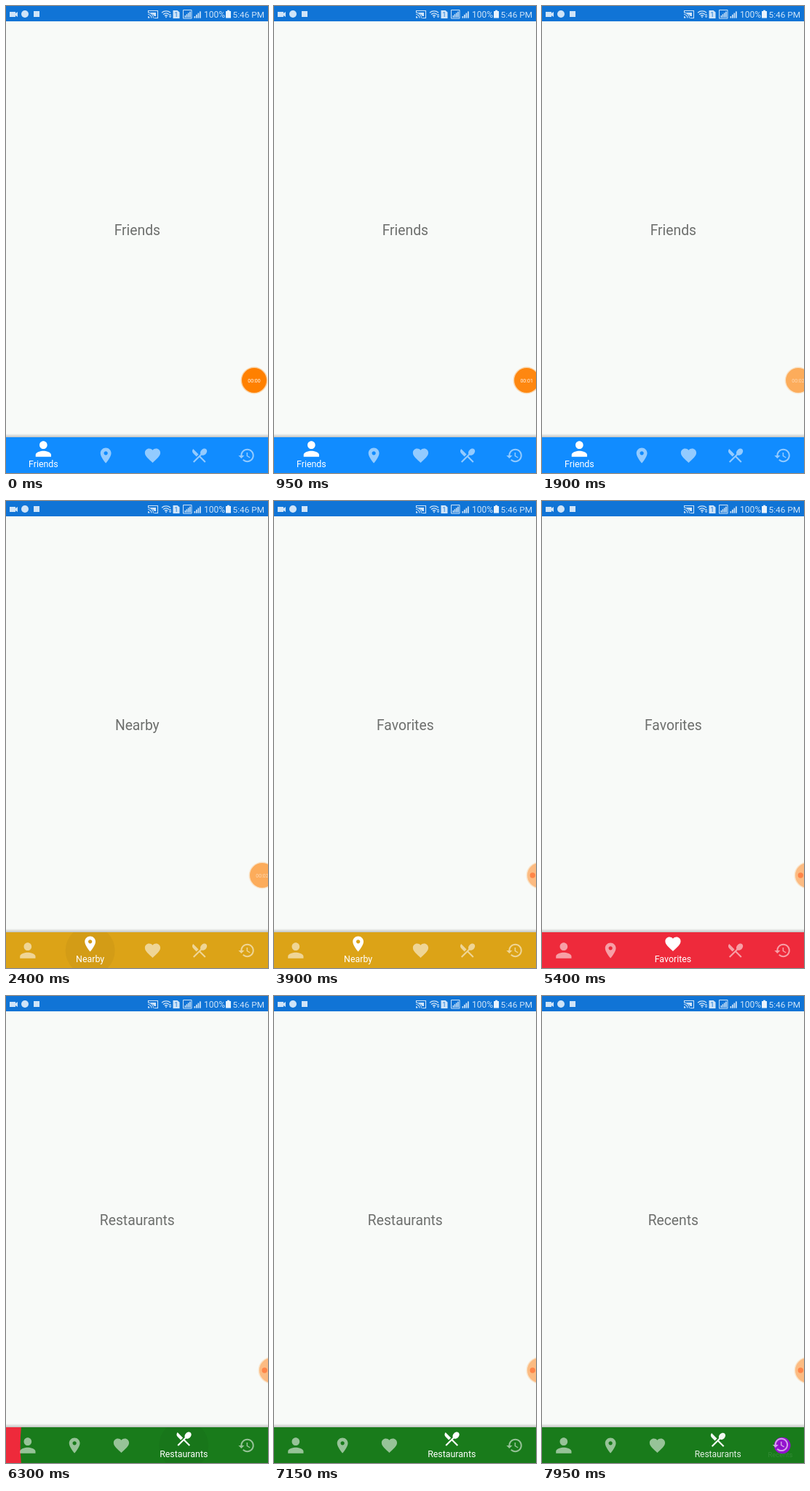
Write an HTML page with a canvas that moves like this. It is 360x640 px and loops after 8 s.

```html
<!DOCTYPE html>
<html lang="en">
<head>
<meta charset="utf-8">
<style>
  html, body { margin: 0; width: 100%; height: 100%; overflow: hidden; background: #f8faf8; }
  canvas { display: block; width: 360px; height: 640px; }
</style>
</head>
<body>
<canvas id="stage"></canvas>
<script>
const W = 360, H = 640, LOOP = 8000, BAR_TOP = 591;
const canvas = document.getElementById('stage');
const ctx = canvas.getContext('2d');
const dpr = window.devicePixelRatio || 1;
canvas.width = W * dpr;
canvas.height = H * dpr;

const tab = (name, color, scale, midX, path) => ({ name, color, scale, midX, path: new Path2D(path) });
const tabs = [
  tab('Friends', '#118cff', 1.33, 12, 'M12 12c2.21 0 4-1.79 4-4s-1.79-4-4-4-4 1.79-4 4 1.79 4 4 4zm0 2c-2.67 0-8 1.34-8 4v2h16v-2c0-2.66-5.33-4-8-4z'),
  tab('Nearby', '#dca317', 1.06, 12, 'M12 2C8.13 2 5 5.13 5 9c0 5.25 7 13 7 13s7-7.75 7-13c0-3.87-3.13-7-7-7zm0 9.5c-1.38 0-2.5-1.12-2.5-2.5s1.12-2.5 2.5-2.5 2.5 1.12 2.5 2.5-1.12 2.5-2.5 2.5z'),
  tab('Favorites', '#ee2a3b', 1.06, 12, 'M12 21.35l-1.45-1.32C5.4 15.36 2 12.28 2 8.5 2 5.42 4.42 3 7.5 3c1.74 0 3.41.81 4.5 2.09C13.09 3.81 14.76 3 16.5 3 19.58 3 22 5.42 22 8.5c0 3.78-3.4 6.86-8.55 11.54L12 21.35z'),
  tab('Restaurants', '#197b1b', 1.06, 12, 'M8.1 13.34l2.83-2.83L3.91 3.5c-1.56 1.56-1.56 4.09 0 5.66l4.19 4.18zm6.78-1.81c1.53.71 3.68.21 5.27-1.38 1.91-1.91 2.28-4.65.81-6.12-1.46-1.46-4.2-1.1-6.12.81-1.59 1.59-2.09 3.74-1.38 5.27L3.7 19.87l1.41 1.41L12 14.41l6.88 6.88 1.41-1.41L13.41 13l1.47-1.47z'),
  tab('Recents', '#9412cf', 1.02, 11.5, 'M13 3c-4.97 0-9 4.03-9 9H1l3.89 3.89.07.14L9 12H6c0-3.87 3.13-7 7-7s7 3.13 7 7-3.13 7-7 7c-1.93 0-3.68-.79-4.94-2.06l-1.42 1.42C8.27 19.99 10.51 21 13 21c4.97 0 9-4.03 9-9s-4.03-9-9-9zm-1 5v5l4.28 2.54.72-1.21-3.5-2.08V8H12z')
];
// When the page title changes and when the bar starts to follow.
const taps = [
  { page: 0, bar: -1000 },
  { page: 2050, bar: 2080 },
  { page: 3890, bar: 4110 },
  { page: 6090, bar: 6115 },
  { page: 7900, bar: 7917 }
];

const clamp = v => Math.max(0, Math.min(1, v));
const span = (t, start, length) => clamp((t - start) / length);
const ease = p => (1 - Math.cos(Math.PI * p)) / 2;
const mix = (a, b, p) => a + (b - a) * p;
const lastIndex = (t, key) => taps.reduce((found, tap, i) => t >= tap[key] ? i : found, 0);

function disc(x, y, r, color) {
  ctx.fillStyle = color;
  ctx.beginPath();
  ctx.arc(x, y, r, 0, 2 * Math.PI);
  ctx.fill();
}

function box(x, y, w, h, color) {
  ctx.fillStyle = color;
  ctx.fillRect(x, y, w, h);
}

function label(text, x, y, size, color, align = 'center') {
  ctx.font = `${size}px Roboto, sans-serif`;
  ctx.textAlign = align;
  ctx.fillStyle = color;
  ctx.fillText(text, x, y);
}

function strokePath(d, color, width = 1) {
  ctx.strokeStyle = color;
  ctx.lineWidth = width;
  ctx.stroke(new Path2D(d));
}

function fillPath(d, color) {
  ctx.fillStyle = color;
  ctx.fill(new Path2D(d));
}

function drawStatus() {
  const ink = '#cfe4f8';
  box(0, 0, W, 21, '#1074d6');
  fillPath('M5 8h8v2l3-2v7l-3-2v2H5z', ink);
  disc(26, 11, 5, ink);
  box(38, 7, 8, 8, ink);

  strokePath('M195.5 9V6.5h13v10h-5M195 11.5a5 5 0 0 1 5 5M195 9a7.5 7.5 0 0 1 7.5 7.5', ink, 1.1);
  fillPath('M195 14a2.5 2.5 0 0 1 2.5 2.5H195zM199 9h7v5h-2a8 8 0 0 0-5-4z', ink);
  strokePath('M214 9.2a9 9 0 0 1 12 0M216 11.5a6 6 0 0 1 8 0M218 13.6a3 3 0 0 1 4 0', ink, 1.3);
  fillPath('M218.5 14.5h3L220 16.5zM223.5 13h4l-2-2zM223.5 14h4l-2 2z', ink);
  fillPath('M229.5 6h6l3 2.5V17h-9z', ink);
  label('1', 234, 15, 8.5, '#1074d6');
  strokePath('M243.5 5.5h11.5v11.5h-11.5z', ink);
  for (let i = 0; i < 4; i++) {
    box(245.5 + i * 2.2, 13 - i * 1.8, 1.5, 2.6 + i * 1.8, ink);
    box(258.5 + i * 2.5, 14 - i * 2.2, 1.7, 2.6 + i * 2.2, ink);
  }
  label('100%', 272, 16, 12, ink, 'left');
  fillPath('M302 7h2V5.8h3V7h2v9.5h-7z', '#e8f2fc');
  label('5:46 PM', 355, 16, 11.8, ink, 'right');
}

function drawBar(t) {
  const current = lastIndex(t, 'bar');
  const previous = Math.max(0, current - 1);
  const since = t - taps[current].bar;
  const shift = ease(span(since, 0, 150));
  const active = i => (i === current ? shift : 0) + (i === previous && current ? 1 - shift : 0)
    + (current === 0 && i === 0 ? 1 - shift : 0);

  const shadow = ctx.createLinearGradient(0, 586, 0, BAR_TOP);
  shadow.addColorStop(0, 'rgba(0,0,0,0)');
  shadow.addColorStop(1, 'rgba(0,0,0,.22)');
  box(0, 586, W, 5, shadow);

  ctx.save();
  ctx.beginPath();
  ctx.rect(0, BAR_TOP, W, H - BAR_TOP);
  ctx.clip();
  box(0, BAR_TOP, W, H - BAR_TOP, tabs[previous].color);
  const revealX = 30 + 64.3 * current + 42.9 / 2;
  const originX = current === 0 ? revealX : 30 + 64.3 * current + 43;
  disc(originX, 616, 360 * ease(span(since, 0, 300)), tabs[current].color);

  let x = -2.3;
  tabs.forEach((item, i) => {
    const on = active(i);
    const width = mix(64.3, 107.3, on);
    const center = x + width / 2;
    x += width;
    if (i === current && current) {
      const fade = 1 - span(since, 350, 300);
      disc(center, 616, 34 * ease(span(since, 0, 180)), `rgba(0,0,0,${0.045 * fade})`);
    }
    ctx.save();
    ctx.globalAlpha = mix(0.55, 1, on);
    ctx.translate(center, mix(616, 607, on));
    ctx.scale(item.scale, item.scale);
    ctx.translate(-item.midX, -12);
    ctx.fillStyle = '#fff';
    ctx.fill(item.path, 'evenodd');
    ctx.restore();
    if (on > 0) {
      ctx.globalAlpha = on;
      label(item.name, center, 631.5, mix(9, 12.4, on), '#fff');
      ctx.globalAlpha = 1;
    }
  });
  ctx.restore();
}

function drawRecorder(t) {
  const dock = ease(span(t, 3500, 150));
  const x = mix(341, 352, span(t, 840, 200)) + 13 * dock;
  ctx.globalAlpha = mix(1, 0.55, span(t, 900, 250));
  disc(x, 513, 18.5, '#fbd3a6');
  disc(x, 513, 17, dock ? '#ff9c48' : '#ff8000');
  if (dock) {
    ctx.globalAlpha = dock;
    disc(x - 9.7, 513, 3.7, '#ff8548');
  } else {
    const seconds = Math.floor((t + 400) / 1000);
    label(`00:0${seconds}`, x, 515.5, 7, '#fff');
  }
  ctx.globalAlpha = 1;
}

function draw(now) {
  const t = now % LOOP;
  ctx.setTransform(dpr, 0, 0, dpr, 0, 0);
  box(0, 0, W, H, '#f8faf8');
  drawStatus();
  label(tabs[lastIndex(t, 'page')].name, 180.3, 313.5, 19.3, '#6d6f6d');
  drawBar(t);
  drawRecorder(t);
  requestAnimationFrame(draw);
}
requestAnimationFrame(draw);
</script>
</body>
</html>
```
